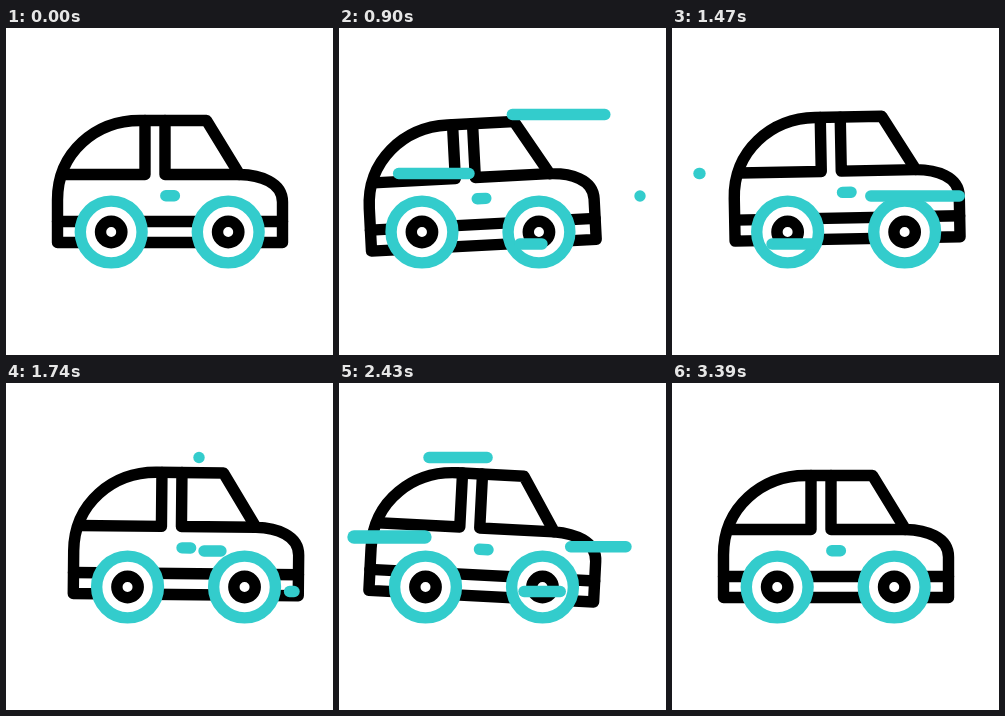
An HTML page for the animation above (3630 ms loop, 327x327 px).

```html
<!DOCTYPE html>
<html lang="en">
<head>
<meta charset="utf-8">
<title>Driving car</title>
<style>
  html, body { margin: 0; width: 100%; height: 100%; overflow: hidden; background: #fff; }
  svg { display: block; width: 100%; height: 100%; }
  path, line, circle { fill: none; stroke: #000; stroke-width: 11.4; stroke-linecap: round; stroke-linejoin: round; }
  .teal { stroke: #33cccc; }
  .disc { fill: #fff; }
</style>
</head>
<body>
<svg viewBox="0 0 327 327">
  <defs>
    <g id="wheel">
      <circle class="teal disc" r="30.9"/>
      <circle r="10.7"/>
    </g>
  </defs>
  <g id="body">
    <path d="M51.5 214.5V172C51.5 124 90 92.5 134 92.5H200.5L233.5 146.5C254 147 276.5 154 276.5 174V214.5Z"/>
    <path d="M57 146.5H139V92.5M159 92.5V146.5H233.5M51.5 193.5H276.5"/>
    <path class="teal" d="M159.8 167.8H168.4"/>
  </g>
  <g id="wheels">
    <use href="#wheel" x="105.2" y="204"/>
    <use href="#wheel" x="222.2" y="204"/>
  </g>
  <g id="wind"></g>
</svg>
<script>
  const STEP = 30, LOOP = 3630, LAST = 113;
  const BOUNCE = 28, LIFT = -5.2;

  // Turning points as [step, value], eased in and out in between.
  const drive = [[0, 0], [29, -22.4], [56, 17], [81, -18.7], [108, 0]];
  const tilt = [[0, 0], [31, -3], [79, 3], [105, 0]];
  const sink = [[0, 0], [28, 3.3], [56, -2.8], [84, -0.7], [112, 0]];

  // Every streak runs left by the same length; its tail follows its head.
  const LENGTH = 103, HEAD = [0, 20], TAIL = [15, 32.5];
  const streaks = [
    { start: 13.5, x: 268, y: 86.5 },
    { start: 17.5, x: 130, y: 145.5 },
    { start: 24, x: 203, y: 216 },
    { start: 30, x: 301, y: 168 },
    { start: 55.5, x: 288, y: 208.5 },
    { start: 58, x: 193, y: 74.5 },
    { start: 59.5, x: 118, y: 154, width: 13.4 },
    { start: 70.5, x: 287, y: 163.7 }
  ];

  const el = id => document.getElementById(id);

  function ease(x, [from, to]) {
    const s = Math.min(1, Math.max(0, (x - from) / (to - from)));
    return s * s * (3 - 2 * s);
  }

  function valueAt(keys, n) {
    return keys.slice(1).reduce((sum, [step, value], i) => {
      const [prevStep, prev] = keys[i];
      return sum + (value - prev) * ease(n, [prevStep, step]);
    }, keys[0][1]);
  }

  // The body hops up once per bounce and lands at the sink height.
  function heightAt(n) {
    const hop = Math.sin(Math.PI * n / BOUNCE) ** 2;
    return valueAt(sink, n) * (1 - hop) + LIFT * hop;
  }

  for (const streak of streaks) {
    streak.line = document.createElementNS("http://www.w3.org/2000/svg", "line");
    streak.line.setAttribute("class", "teal");
    streak.line.setAttribute("y1", streak.y);
    streak.line.setAttribute("y2", streak.y);
    if (streak.width) streak.line.style.strokeWidth = streak.width;
    el("wind").append(streak.line);
  }

  function draw(n) {
    const x = valueAt(drive, n);
    el("wheels").setAttribute("transform", `translate(${x} 0)`);
    el("body").setAttribute("transform",
      `translate(${x} ${heightAt(n)}) rotate(${valueAt(tilt, n)} 164 155)`);

    for (const { start, x, line } of streaks) {
      const age = n - start;
      const shown = age >= 0 && age < TAIL[1];
      line.setAttribute("visibility", shown ? "visible" : "hidden");
      line.setAttribute("x1", x - LENGTH * ease(age, HEAD));
      line.setAttribute("x2", x - LENGTH * ease(age, TAIL));
    }
  }

  const began = performance.now();
  function tick() {
    const t = (performance.now() - began) % LOOP;
    draw(Math.min(LAST, Math.floor(t / STEP)));
    requestAnimationFrame(tick);
  }
  tick();
</script>
</body>
</html>
```
